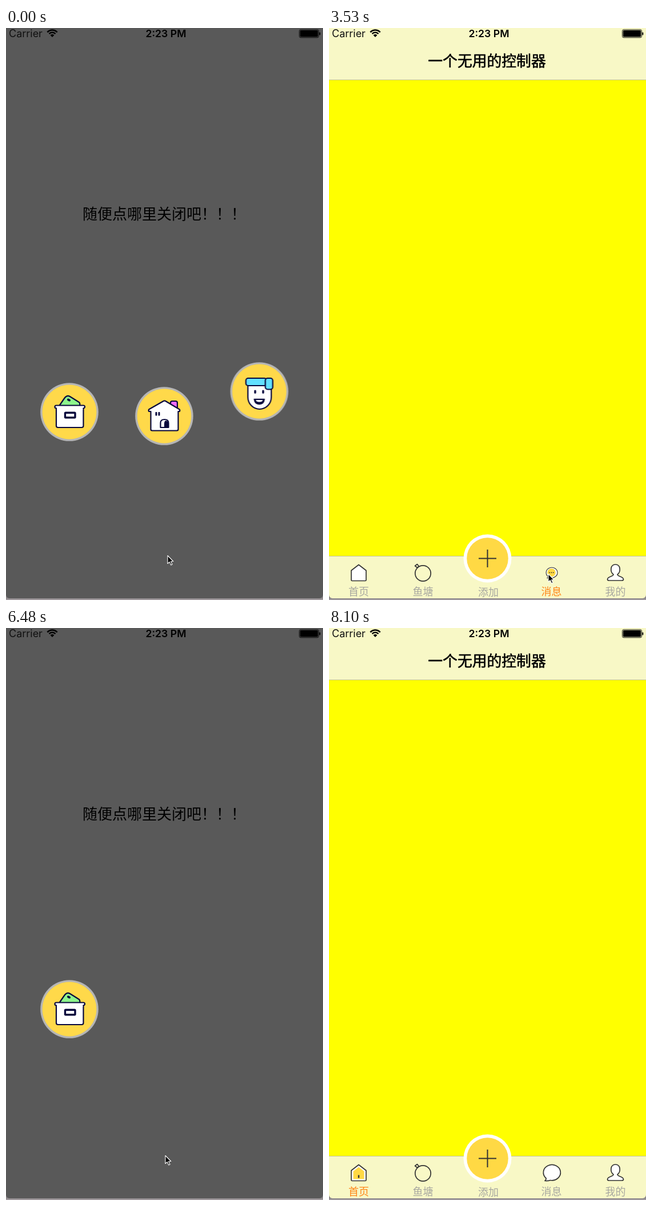
An HTML page with a canvas that plays this animation: 555 by 998 pixels, repeating every 8.55 s.

```html
<!DOCTYPE html>
<html lang="zh-CN">
<head>
<meta charset="utf-8">
<title>Tab bar menu</title>
<style>
html, body { margin: 0; width: 100%; height: 100%; overflow: hidden; background: #595959; }
canvas { display: block; }
</style>
</head>
<body>
<canvas id="stage" width="555" height="998"></canvas>
<script>
const LOOP = 8550, STEP = 147.3;
const CJK = '"Noto Sans CJK SC", "Noto Sans CJK", sans-serif';
const UI = 'Inter, Roboto, sans-serif';
const NAVY = '#08083c', GOLD = '#ffd944', LINE = '#333333';
let ctx = document.getElementById('stage').getContext('2d');
const main = ctx;

function paint(fill, stroke, width = 2) {
  if (fill) { ctx.fillStyle = fill; ctx.fill(); }
  if (stroke) { ctx.strokeStyle = stroke; ctx.lineWidth = width; ctx.stroke(); }
}
function rect(x, y, w, h, fill) { ctx.fillStyle = fill; ctx.fillRect(x, y, w, h); }
function box(x, y, w, h, r, fill, stroke, width) {
  ctx.beginPath(); ctx.roundRect(x, y, w, h, r); paint(fill, stroke, width);
}
function disc(x, y, r, fill, stroke, width) {
  ctx.beginPath(); ctx.arc(x, y, r, 0, Math.PI * 2); paint(fill, stroke, width);
}
function shape(d, fill, stroke, width) {
  const p = new Path2D(d);
  if (fill) { ctx.fillStyle = fill; ctx.fill(p); }
  if (stroke) { ctx.strokeStyle = stroke; ctx.lineWidth = width || 2; ctx.stroke(p); }
}
function text(s, x, y, font, color, align = 'left') {
  ctx.font = font; ctx.fillStyle = color; ctx.textAlign = align;
  ctx.fillText(s, x, y);
}

// Menu buttons, drawn around their own centre
const menuArt = [
  () => {
    shape('M-17 -12 L-8 -25 Q-4 -30 1 -27 L17 -17 Q19 -15 18 -11 L-16 -11 Z', '#8df58c', NAVY, 2.2);
    ctx.beginPath(); ctx.ellipse(-1, -21, 3.2, 2, 0.5, 0, 7); paint(NAVY);
    box(-23, -9, 47.5, 36, 3, '#fff', NAVY, 2.2);
    box(-25.5, -11.5, 52.5, 5, 2.5, '#fff', NAVY, 2.2);
    rect(-21.9, -8, 45.3, 4, '#fff');
    box(-7.5, 1.3, 17.5, 8.5, 1, '#fff', NAVY, 3.4);
  },
  () => {
    box(11, -26, 12, 15, 3, '#f06bff', NAVY, 2.2);
    shape('M-23.5 -8 L-23.5 23 Q-23.5 25.5 -21 25.5 L22 25.5 Q24.5 25.5 24.5 23 L24.5 -8 L27 -8 Q28 -11 26 -12 L2 -26.2 Q0.5 -27 -1 -26.2 L-26 -12 Q-28 -11 -27 -8 Z', '#fff', NAVY, 2.2);
    box(-15.5, -7, 3, 6.5, 1, NAVY);
    box(-10.5, -7, 3, 6.5, 1, NAVY);
    shape('M-6.5 20 L-6.5 12 Q-6.5 6 .5 6 Q7.5 6 7.5 12 L7.5 20 Z', '#fff', NAVY, 2.2);
    shape('M0 20 L0 14 Q0 8 3 8 Q7.5 9 7.5 13 L7.5 20 Z', NAVY);
  },
  () => {
    shape('M-20 -12 L-20 10 A20.5 21 0 0 0 21 10 L21 -12 Z', '#fff', NAVY, 2.2);
    box(-23.5, -23, 36, 13, 4, '#62e0ff', NAVY, 2.2);
    box(10.5, -23, 13, 19.5, 4, '#62e0ff', NAVY, 2.2);
    box(-9, -2.5, 3.4, 6.5, 1.7, NAVY);
    box(5, -2.5, 3.4, 6.5, 1.7, NAVY);
    shape('M-9 13.5 L9 13.5 Q8 22.5 0 22.5 Q-8 22.5 -9 13.5 Z', NAVY, NAVY, 1.6);
    shape('M-6 15 L6 15 Q5.5 18.5 0 18.5 Q-5.5 18.5 -6 15 Z', '#fff');
  }
];
const menuButtons = menuArt.map(art => {
  const c = document.createElement('canvas');
  c.width = c.height = 106;
  ctx = c.getContext('2d');
  ctx.lineJoin = 'round';
  ctx.translate(53, 53);
  disc(0, 0, 50.8, '#b5b5b5');
  disc(0, 0, 47.4, '#ffd94a');
  art();
  return c;
});
ctx = main;

// Tab icons, drawn around their own centre
const tabs = [
  { label: '首页', x: 52, icon: on => {
    shape('M0 -14 L13 -4 L13 12.5 Q13 14 11.5 14 L-11.5 14 Q-13 14 -13 12.5 L-13 -4 Z', '#fff', LINE, 1.7);
    if (on) {
      shape('M0 -10 L9.5 -2.5 L9.5 11 L-9.5 11 L-9.5 -2.5 Z', GOLD);
      rect(-1.2, 4, 2.4, 5, LINE);
    }
  } },
  { label: '鱼塘', x: 164.5, icon: on => {
    shape('M-10 -9 L-14 -12 L-10 -15 L-7 -11 Z', null, LINE, 1.6);
    disc(0, 1, 13.7, on ? GOLD : null, LINE, 1.7);
  } },
  { label: '消息', x: 389.5, icon: on => {
    shape('M-9.5 9.5 A15 13.6 0 1 1 -2 13 Q-6 14.5 -11.5 14 Q-9 12 -9.5 9.5 Z', '#fff', LINE, 1.7);
    if (on) {
      disc(0, -0.5, 11, GOLD);
      for (const x of [-5, 0, 5]) disc(x, -0.5, 1.3, LINE);
    }
  } },
  { label: '我的', x: 501.5, icon: on => {
    shape('M-3.5 3 C-10 -2 -9 -14.5 0 -14.5 C9 -14.5 10 -2 3.5 3 C4 7 14 6 14 11.5 Q14 13.5 11 13.5 L-11 13.5 Q-14 13.5 -14 11.5 C-14 6 -4 7 -3.5 3 Z', on ? GOLD : '#fff', LINE, 1.7);
  } }
];

const selections = [[0, 0], [14, 1], [24, 2], [29, 3], [38, 0]];
const bounce = [0.66, 1.08, 0.96, 1];

// Pointer positions: tick, x, y
const pointer = [
  [0, 283, 920], [5, 284, 920], [8, 312, 892], [9, 320, 879], [13, 166, 948],
  [16, 163, 950], [20, 240, 986], [23, 383, 953], [25, 384, 951], [28, 497, 950],
  [30, 530, 962], [32, 500, 952], [36, 90, 950], [37, 42, 950], [38, 40, 950],
  [40, 38, 947], [41, 160, 934], [42, 279, 920], [48, 279, 920], [50, 401, 915], [54, 401, 915]
];

function drawPointer(tick) {
  const next = pointer.findIndex(p => p[0] >= tick);
  if (next < 0) return;
  const b = pointer[next], a = pointer[Math.max(0, next - 1)];
  const k = b[0] > a[0] ? (tick - a[0]) / (b[0] - a[0]) : 0;
  ctx.save();
  ctx.translate(Math.round(a[1] + (b[1] - a[1]) * k), Math.round(a[2] + (b[2] - a[2]) * k));
  shape('M0 .5 L0 14.5 L3.2 11.6 L5.8 17 L8 16 L5.6 10.8 L9.8 10.5 Z', '#000', '#fff', 1.1);
  ctx.restore();
}

function drawStatus() {
  text('Carrier', 5, 16, `18px ${UI}`, '#111');
  text('2:23 PM', 280, 16, `600 17.7px ${UI}`, '#000', 'center');
  for (const [r, w] of [[11.5, 2.6], [7.2, 2.5]]) {
    ctx.beginPath(); ctx.arc(81, 15, r, -Math.PI * 0.77, -Math.PI * 0.23);
    paint(null, '#000', w);
  }
  shape('M81 16 L77.6 12.4 Q81 9.6 84.4 12.4 Z', '#000');
  box(513.5, 2.8, 34, 14, 2.5, null, '#000', 0.9);
  box(514.8, 4.1, 31.4, 11.4, 1.5, '#000');
  box(548.5, 7.5, 1.8, 5, 1, '#000');
}

function drawHome(tick) {
  rect(0, 0, 555, 998, '#ffff00');
  rect(0, 0, 555, 90, '#f8f8c6');
  rect(0, 90, 555, 1, '#c4c49b');
  rect(0, 921, 555, 77, '#f8f8c6');
  rect(0, 921, 555, 1, '#c4c49b');
  text('一个无用的控制器', 276.5, 67, `25.8px ${CJK}`, '#000', 'center');
  ctx.strokeStyle = '#000'; ctx.lineWidth = 0.6;
  ctx.strokeText('一个无用的控制器', 276.5, 67);

  const [since, selected] = selections.filter(s => s[0] <= tick).pop();
  tabs.forEach((tab, i) => {
    const on = i === selected;
    const age = Math.min(tick - since, bounce.length - 1);
    const scale = on ? bounce[age] : 1;
    ctx.save();
    ctx.translate(tab.x, 950.5);
    ctx.scale(scale, scale);
    tab.icon(on);
    ctx.restore();
    text(tab.label, tab.x, 989.5, `18px ${CJK}`, on ? '#ff8618' : '#a8a8a0', 'center');
  });
  disc(277.5, 925.5, 42, '#fff');
  disc(277.5, 925.5, 36.3, GOLD);
  rect(262, 924.5, 31, 2, LINE);
  rect(276.5, 910, 2, 31, LINE);
  text('添加', 279, 990.5, `18px ${CJK}`, '#a8a8a0', 'center');
}

// age: seconds since opening; left: seconds until the last button has gone
function drawMenu(age, left) {
  rect(0, 0, 555, 998, '#595959');
  text('随便点哪里关闭吧！！！', 134, 334, `26px ${CJK}`, '#000');
  menuButtons.forEach((image, i) => {
    const t = age - i * 0.15;
    const gone = Math.max(0, 1 - (left - (2 - i) * 0.1) / 0.3);
    if (t < 0 || gone >= 1) return;
    const spring = 380 * Math.exp(-10.3 * t) * Math.cos(15.2 * t);
    ctx.globalAlpha = 1 - gone;
    ctx.drawImage(image, [58, 224, 390.5][i], Math.round(617 + spring + 229 * gone));
    ctx.globalAlpha = 1;
  });
}

// Strip below the window, showing around its rounded lower corners
function drawWindowEdge() {
  const g = ctx.createLinearGradient(0, 995, 0, 998);
  g.addColorStop(0, '#8a8588');
  g.addColorStop(1, '#a9a2a6');
  ctx.beginPath();
  ctx.rect(0, 980, 555, 18);
  ctx.roundRect(0, 980, 555, 15, [0, 0, 6, 6]);
  ctx.fillStyle = g;
  ctx.fill('evenodd');
}

function render(ms) {
  const tick = Math.min(55, Math.floor((ms + 10) / STEP));
  const s = STEP / 1000;
  ctx.lineJoin = 'round';
  if (tick < 9) drawMenu(0.525 + tick * s, 0.023 + (8 - tick) * s);
  else if (tick >= 44 && tick < 54) drawMenu(0.106 + (tick - 44) * s, 0.023 + (53 - tick) * s);
  else drawHome(tick);
  drawStatus();
  drawWindowEdge();
  drawPointer(tick);
}

const start = performance.now();
function loop() {
  render((performance.now() - start) % LOOP);
  requestAnimationFrame(loop);
}
loop();
</script>
</body>
</html>
```
